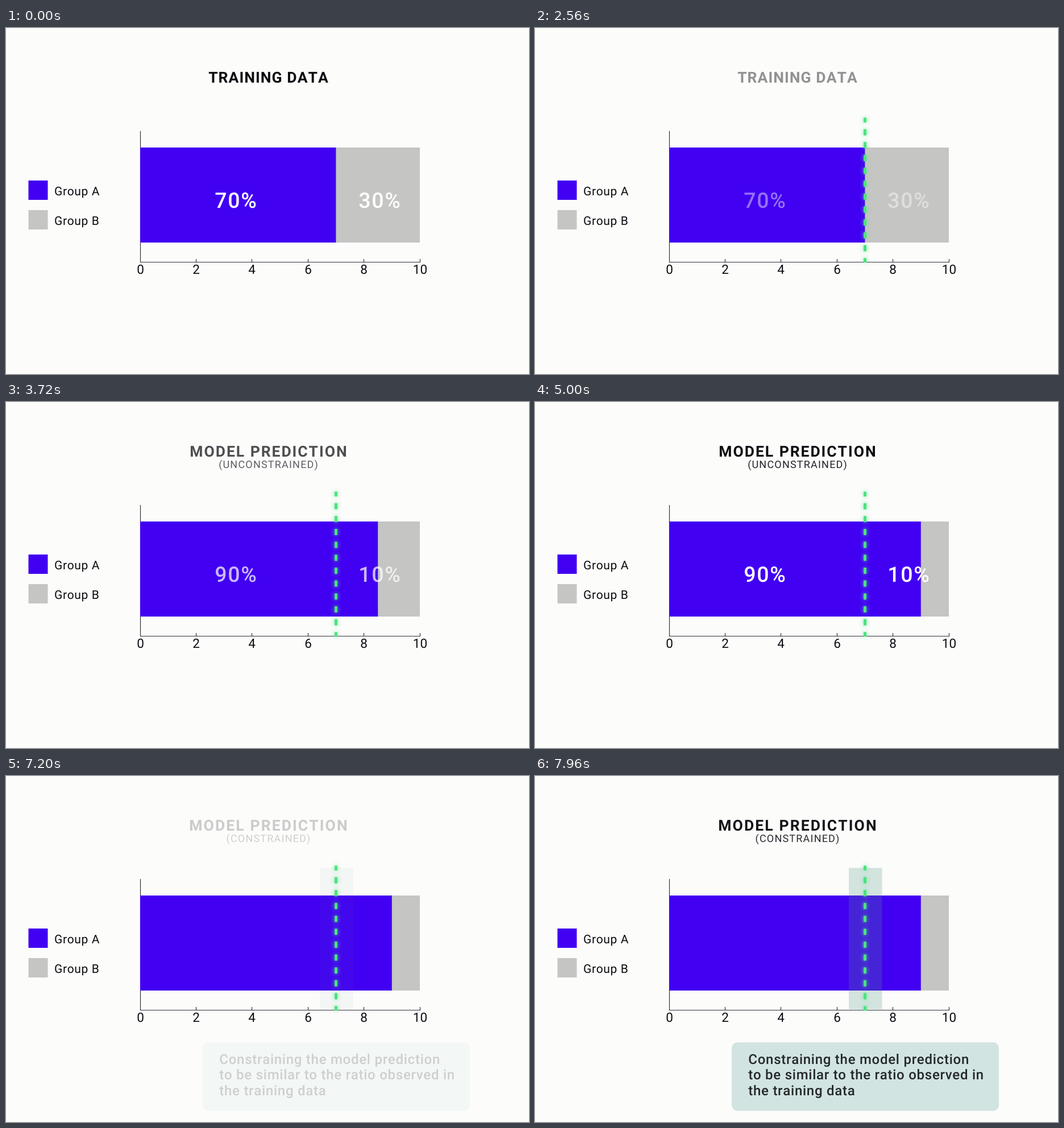
Animation of 920 by 608 pixels, one loop 8000 ms. Source, as an HTML page:

```html
<!DOCTYPE html>
<html lang="en">
<head>
<meta charset="utf-8">
<title>Training data and model prediction</title>
<style>
  html, body { margin: 0; width: 100%; height: 100%; overflow: hidden; background: #fcfcfb; }
  svg { display: block; width: 920px; height: 608px; }
  text { font-family: Roboto, "Liberation Sans", sans-serif; font-kerning: none; fill: #0c0c10; text-rendering: geometricPrecision; }
  .title { font-size: 26.5px; font-weight: 700; }
  .sub { font-size: 18px; fill: #222228; }
  .pct { font-size: 37.5px; font-weight: 500; fill: #fff; }
  .tick { font-size: 22.5px; }
  .legend { font-size: 21px; }
  .note { font-size: 24px; font-weight: 500; fill: #1c1f22; }
  #goal { filter: drop-shadow(0 0 3.5px rgba(75, 235, 130, .9)); }
</style>
</head>
<body>
<svg id="stage" viewBox="0 0 920 608">
  <g id="chart"></g>
  <g id="band"></g>
  <g id="goal"></g>
  <g id="training"></g>
  <g id="free"></g>
  <g id="bound"></g>
</svg>
<script>
const NS = 'http://www.w3.org/2000/svg';
const BLUE = '#4200f2', GRAY = '#c5c5c4', GREEN = '#4be27f';
const LEFT = 236, UNIT = 49.2, TOP = 210, HEIGHT = 167;
const LOOP = 8000, STEP = 40;
const $ = id => document.getElementById(id);
const xAt = v => LEFT + v * UNIT;

function add(parent, tag, attrs, str) {
  const el = document.createElementNS(NS, tag);
  for (const k in attrs) el.setAttribute(k, attrs[k]);
  if (str) el.textContent = str;
  parent.append(el);
  return el;
}

function rect(parent, x, y, width, height, fill, rx = 0) {
  return add(parent, 'rect', { x, y, width, height, fill, rx });
}

function label(parent, cls, str, x, y, gap = 0, anchor = 'start') {
  // the trailing gap would shift centred text
  if (anchor === 'middle') x += gap / 2;
  add(parent, 'text', { class: cls, x, y, 'letter-spacing': gap, 'text-anchor': anchor }, str);
}
const mid = (parent, cls, str, x, y, gap) => label(parent, cls, str, x, y, gap, 'middle');

// Axis, bars and legend
const chart = $('chart');
let axis = 'M236.5 181V411.5H729';
for (let v = 0; v <= 10; v += 2) {
  const x = Math.floor(xAt(v)) + .5;
  axis += `M${x} 406V411.5`;
  mid(chart, 'tick', String(v), x, 431.5, 0);
}
add(chart, 'path', { d: axis, fill: 'none', stroke: '#33333c', 'stroke-width': 1.2 });
rect(chart, LEFT, TOP, UNIT * 10, HEIGHT, GRAY);
const bar = rect(chart, LEFT, TOP, 0, HEIGHT, BLUE);
[['Group A', BLUE, 268], ['Group B', GRAY, 320]].forEach(([name, fill, y]) => {
  rect(chart, 39.5, y, 34, 34, fill);
  label(chart, 'legend', name, 85, y + 25.5, .65);
});

// Dashed goal line with a tolerance band behind it
for (let i = 0; i < 12; i++) {
  const y = 155 + i * 22.65;
  const a = Math.max(y, 157.5), b = Math.min(y + 11, 412);
  rect($('goal'), 578, a, 5, b - a, GREEN, 1.2);
}
rect($('band'), 552, 161.5, 58.5, 248.5, 'rgba(80, 146, 128, .25)');

// Scenes
const MID = 461.5;
function scene(id, title, gap, sub, pcts = []) {
  const g = $(id);
  mid(g, 'title', title, MID, 96, gap);
  if (sub) mid(g, 'sub', sub, MID, 116.4, 1.2);
  pcts.forEach((p, i) => mid(g, 'pct', p, i ? 657 : 404, 316, 1.6));
  return g;
}
scene('training', 'TRAINING DATA', 1.05, '', ['70%', '30%']);
scene('free', 'MODEL PREDICTION', 1.95, '(UNCONSTRAINED)', ['90%', '10%']);
const bound = scene('bound', 'MODEL PREDICTION', 2.1, '(CONSTRAINED)');
rect(bound, 346, 468, 470, 120.5, '#d1e4e0', 10);
['Constraining the model prediction',
 'to be similar to the ratio observed in',
 'the training data'].forEach((s, i) => label(bound, 'note', s, 375.3, 505.8 + i * 27.6, .73));

// [time, value] steps, linear in between
const fades = {
  goal: [[0, 0], [1000, 1]],
  training: [[2000, 1], [3000, 0]],
  free: [[3000, 0], [4000, 1], [6000, 1], [7000, 0]],
  bound: [[7000, 0], [8000, 1]],
  band: [[7000, 0], [8000, 1]]
};
const growth = [[3000, 7], [3960, 9]];

function valueAt(steps, t) {
  const i = steps.findIndex(s => s[0] > t);
  if (i === 0) return steps[0][1];
  if (i < 0) return steps[steps.length - 1][1];
  const [t0, v0] = steps[i - 1], [t1, v1] = steps[i];
  return v0 + (v1 - v0) * (t - t0) / (t1 - t0);
}

function draw(t) {
  for (const id in fades) $(id).style.opacity = valueAt(fades[id], t);
  bar.setAttribute('width', valueAt(growth, t) * UNIT);
}

const start = performance.now();
function tick() {
  const t = (performance.now() - start) % LOOP;
  draw(Math.floor(t / STEP) * STEP);
  requestAnimationFrame(tick);
}
draw(0);
requestAnimationFrame(tick);
</script>
</body>
</html>
```
